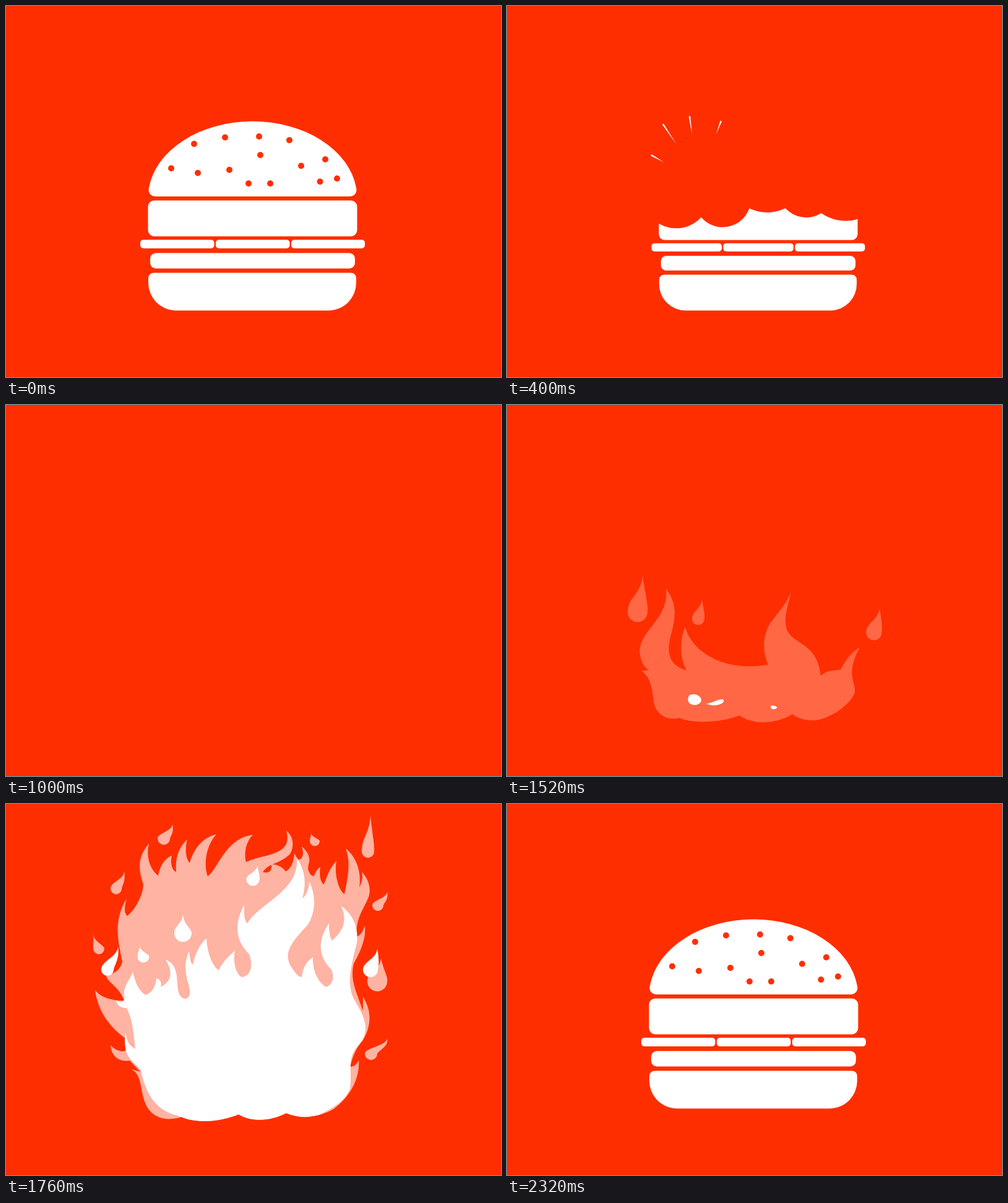
An HTML page that plays this animation: 800 by 600 pixels, repeating every 2.92 s.

```html
<!DOCTYPE html>
<html lang="en">
<head>
<meta charset="utf-8">
<title>Burger</title>
<style>
  html, body { margin: 0; width: 100%; height: 100%; overflow: hidden; background: #ff2e00; }
  svg { display: block; width: 100vw; height: 100vh; }
</style>
</head>
<body>
<svg viewBox="0 0 800 600" fill="#fff">
  <rect width="800" height="600" fill="#ff2e00"/>
  <g id="burger">
    <path d="M242 308C234 308 229 302 231 294A169 124 0 0 1 566 294C568 302 563 308 555 308Z"/>
    <g id="seeds" fill="#ff2e00"></g>
    <rect x="229.5" y="314.5" width="338" height="58" rx="10"/>
    <rect x="217" y="378" width="119.5" height="14" rx="5"/>
    <rect x="339" y="378" width="119.5" height="14" rx="5"/>
    <rect x="461" y="378" width="119" height="14" rx="5"/>
    <rect x="233" y="399.5" width="331" height="25" rx="9"/>
    <path d="M240 431.5H556.5Q566 431.5 566 441V447A45 45 0 0 1 521 492.5H275A45 45 0 0 1 230 447V441Q230 431.5 240 431.5Z"/>
    <g id="bites" fill="#ff2e00">
      <path d="M330 150A60 60 0 0 0 352 216A72 72 0 0 0 444.7 318.3A48 48 0 0 0 505.8 326.7A70 70 0 0 0 610 300V100Z"/>
      <path d="M201 295A58 58 0 0 0 301.6 334A48 48 0 0 0 386 304V150H201Z"/>
      <path d="M353 349.6A58 58 0 0 0 412.7 386A49 49 0 0 0 486.4 410A48 48 0 0 0 565 440.5L620 430V290H353Z"/>
    </g>
  </g>
  <path id="sparks"/>
  <g id="pale"><path id="outer"/><path id="paleDrops"/></g>
  <path id="inner"/>
  <path id="whiteDrops"/>
  <g id="embers">
    <path d="M294 470C299 466 309 467 313 474C317 481 308 486 302 485C294 484 290 479 294 470Z"/>
    <path d="M322 483C333 482 340 475 349 476C353 479 348 484 340 485Q330 487 322 483Z"/>
    <path d="M426 487Q431 484 437 489Q433 494 427 491Z"/>
  </g>
</svg>
<script>
const LOOP = 2920, STEP = 40, POINTS = 800;
const $ = id => document.getElementById(id);
const clamp = (v, a = 0, b = 1) => Math.min(b, Math.max(a, v));
const lerp = (a, b, k) => a + (b - a) * k;
const show = (el, on) => el.setAttribute('display', on ? 'inline' : 'none');

const seeds = [[304,223],[354,212.5],[409,211],[458,217],[411,241],[516,248],[267,262.5],
  [310,270],[361,265],[477,258.5],[392,287],[427,287],[507.5,284],[535,279]];
$('seeds').innerHTML = seeds.map(([x, y]) => `<circle cx="${x}" cy="${y}" r="5"/>`).join('');

// Each bite: start, spark centre, side (1 = from the left, -1 = from the right)
const bites = [[120, 522, 220, -1], [320, 310, 278, 1], [560, 502, 358, -1], [800, 310, 352, 1]];
const rays = [[-36,-54,-58,-87], [-11,-71,-15,-100], [28,-71,36,-92], [-56,-25,-77,-37]];

const flames = {
  low: `M376 502C345 514 300 516 279 506C258 511 240 500 237 480C235 455 230 438 217 430L229 429
    C216 420 212 400 216 388C224 360 262 340 257 297C276 322 272 345 266 368C258 395 258 420 290 429
    C279 408 279 380 288 359C296 388 320 405 345 415C370 424 398 424 422 420C412 395 414 375 424 355
    C438 335 452 322 459 302C455 325 445 345 453 365C464 388 502 385 507 438C517 428 528 430 539 428
    C548 412 556 400 570 392C561 408 556 425 558 440C560 452 563 455 562 465C555 485 525 505 500 510
    C485 511 470 507 461 500C440 514 400 520 376 502Z`,
  tall: `M376 502C345 514 300 516 284 506C262 513 240 510 228 490C215 465 222 440 203 429L217 433L200 415
    C180 418 170 405 169 390C178 400 190 402 194 398L194 380C178 368 150 345 144 301C155 315 175 318 191 318
    C183 295 165 290 162 278C175 275 185 268 188 255C182 225 172 190 195 153C190 170 192 178 196 181
    C215 165 222 140 222 130C213 105 213 85 231 64C226 85 232 105 246 116C249 100 255 90 268 83
    C265 95 268 107 275 110C273 85 280 70 293 57C288 75 292 92 297 95C303 75 315 55 340 49
    C325 65 318 95 326 117C343 105 355 55 399 50C388 60 384 80 388 94C415 80 465 85 453 43
    C468 55 464 75 458 82C440 98 425 95 415 110C425 113 430 108 429 98C437 97 447 102 452 109
    C460 105 465 95 466 80L472 90C480 90 482 80 478 69C490 78 492 90 489 97L488 105C490 112 494 118 498 116
    C500 110 503 105 508 102C506 115 508 125 513 130C518 125 518 110 534 92C530 115 538 140 547 146
    C552 120 558 95 549 72C566 85 575 110 571 135C576 125 577 118 575 110C590 125 590 145 584 155
    C575 175 566 185 566 215C574 212 577 205 580 197C582 215 575 235 562 258C556 285 565 300 577 335
    L577 312C592 335 590 360 577 382C565 395 560 410 556 425C563 425 568 420 570 414
    C572 440 560 470 530 493C505 507 480 510 453 500C425 514 395 514 376 502Z`,
  core: `M376 502C345 514 310 518 280 505C250 498 228 480 218 430C205 415 188 410 193 370
    C196 385 200 392 209 396C206 370 205 350 195 330C188 330 180 328 178 318C188 322 193 320 191 310
    C189 295 200 285 205 272C210 292 215 302 226 309C236 305 242 295 243 282C250 283 252 290 250 296
    C260 290 275 280 258 252C275 258 276 275 277 290C277 305 282 315 290 315C300 313 298 300 293 285
    C288 265 290 250 296 238C298 250 298 258 302 260C306 240 315 225 324 217C325 240 333 262 344 269
    C348 258 358 248 370 237C366 255 372 278 382 280C395 278 400 262 393 243C375 225 365 200 385 163
    C384 180 386 190 390 193C410 160 475 140 470 87C485 110 485 130 479 153C485 148 490 138 490 125
    C502 150 500 175 488 195C465 220 445 240 462 265C468 275 474 280 478 280C480 265 485 255 496 248
    C495 270 505 290 518 296C530 290 530 278 526 268C508 250 500 225 522 193C522 205 523 215 527 221
    C545 205 552 190 542 165C562 180 570 200 567 225C558 260 550 290 562 315C580 345 590 365 570 390
    C550 410 560 430 556 460C550 478 530 492 505 503C485 508 470 507 453 500C425 514 395 514 376 502Z`,
  spark: `M376 500C340 506 300 500 292 478Q300 462 314 478Q370 486 436 488Q450 492 436 498Q400 504 376 500Z`,
  ring: `M384 512C360 513 340 511 322 508C290 510 245 508 238 475C232 455 215 430 205 420
    C190 415 172 405 167 389C175 393 180 394 186 393C155 360 150 330 164 314C168 305 165 292 163 284
    C175 292 178 305 177 321C186 305 190 275 164 264C175 264 185 270 188 274C188 260 190 248 193 238
    C195 250 205 262 216 266C205 235 208 205 222 190C240 175 248 158 230 139C250 145 258 160 256 178
    C252 200 235 220 257 241C267 230 280 220 290 216Q287 209 279 203Q293 206 304 224L328 200
    Q330 190 323 185Q345 193 353 217L390 190L440 190L450 226L468 226L490 205Q484 195 478 184
    C495 190 510 205 518 222L529 230C540 218 550 207 574 203C562 212 556 230 569 252
    C580 240 592 237 608 238C595 248 592 275 600 297C610 295 617 285 619 274C625 285 625 295 620 306
    C610 322 592 335 595 360C605 357 610 350 612 338C620 355 618 385 602 405C612 403 622 395 625 384
    C628 405 622 420 605 435C590 445 575 452 565 459C566 475 562 485 545 493C520 506 480 507 447 505
    C425 511 400 513 384 512Z`,
  dying: `M384 512C330 514 260 512 240 490C225 480 215 470 205 455Q225 465 235 470Q240 455 232 440
    Q260 460 265 475C300 480 340 485 400 484C450 484 500 480 530 470Q545 460 548 440Q560 455 556 470
    Q575 465 590 452C580 480 560 500 520 506C480 510 430 514 384 512Z`
};

function sample(d) {
  const path = document.createElementNS('http://www.w3.org/2000/svg', 'path');
  path.setAttribute('d', d);
  const length = path.getTotalLength();
  return Array.from({ length: POINTS }, (_, i) => path.getPointAtLength(length * i / POINTS));
}
const outlines = {};
for (const name in flames) outlines[name] = sample(flames[name]);

const outerKeys = [[1520, 'low'], [1760, 'tall'], [2000, 'ring'], [2300, 'dying']];
const innerKeys = [[1520, 'spark'], [1760, 'core'], [2000, 'ring']];

function morph(keys, t) {
  let i = 0;
  while (i < keys.length - 2 && t >= keys[i + 1][0]) i++;
  const [t0, a] = keys[i], [t1, b] = keys[i + 1], k = clamp((t - t0) / (t1 - t0));
  if (k === 0) return flames[a];
  if (k === 1) return flames[b];
  return 'M' + outlines[a].map((p, j) => {
    const q = outlines[b][j];
    return lerp(p.x, q.x, k).toFixed(1) + ' ' + lerp(p.y, q.y, k).toFixed(1);
  }).join('L') + 'Z';
}

// Drops: time of full size, tip x and y, belly x and y, belly radius
const paleDrops = [
  [1520,219,276,211,335,16], [1520,315,314,309,346,10], [1520,602,328,593,368,12.5],
  [1760,269,33,255,56,10], [1760,191,109,178,137,9], [1760,141,206,150,234,9],
  [1760,589,18,585,77,10], [1760,493,44,499,60,8], [1760,616,142,601,164,9],
  [1760,616,379,590,404,10], [1760,606,250,600,287,16]];
const whiteDrops = [
  [1760,286,177,286,209,14], [1760,406,100,399,122,10.5], [1760,216,226,222,247,9.5],
  [1760,181,230,164,268,10], [1760,600,234,589,268,12],
  [2000,296,120,281,147,9.5], [2000,172,205,166,231,10], [2000,530,125,535,148,11],
  [2000,616,167,610,193,9], [2000,647,310,639,345,9.5]];

function drop([peak, tx, ty, bx, by, r], t) {
  const age = t - peak, size = 1 - Math.abs(age) / 170;
  if (size <= 0) return '';
  const cx = bx + age * (bx - 398) * 0.0006, cy = by - age * 0.16;
  const dx = (tx - bx) * size, dy = (ty - by) * size;
  r *= size;
  const lean = Math.sign(dx) * r * 0.5;
  return `M${cx + dx} ${cy + dy}C${cx + dx + lean * .6} ${cy + dy * .45} ${cx + r * 1.1} ${cy + dy * .2} ${cx + r} ${cy}` +
    `A${r} ${r} 0 0 1 ${cx - r} ${cy}C${cx - r} ${cy + dy * .4} ${cx + dx - lean * .2} ${cy + dy * .5} ${cx + dx} ${cy + dy}Z`;
}

function ray([ix, iy, ox, oy], [start, cx, cy, side], t) {
  const age = t - start, length = Math.hypot(ox - ix, oy - iy);
  const head = clamp(age / 80), tail = clamp((age - 80) * 0.46 / length);
  if (age <= 0 || tail >= 1) return '';
  const at = k => [cx + side * lerp(ix, ox, k), cy + lerp(iy, oy, k)];
  const [ax, ay] = at(tail), [bx, by] = at(head);
  const nx = (oy - iy) / length * 1.3, ny = -side * (ox - ix) / length * 1.3;
  return `M${ax} ${ay}L${bx + nx} ${by + ny}L${bx - nx} ${by - ny}Z`;
}

function drawBurger(t) {
  const back = t >= 1920;
  show($('burger'), t < 800 || back);
  let transform = '';
  bites.forEach(([start, , , side], i) => {
    const bitten = t >= start && !back, age = t - start;
    if ($('bites').children[i]) show($('bites').children[i], bitten);
    if (bitten && age < 185) {
      const s = 1 - 0.052 * Math.sin(Math.PI * age / 185) ** 2;
      const x = 398 + side * 152;
      transform = `translate(${x} 492) scale(${s}) translate(${-x} -492)`;
    }
  });
  $('burger').setAttribute('transform', transform);
  $('sparks').setAttribute('d', bites.flatMap(b => rays.map(r => ray(r, b, t))).join(''));
}

function drawFire(t) {
  const burning = t >= 1520 && t < 2320;
  show($('pale'), burning);
  show($('inner'), burning && t >= 1560 && t <= 2000);
  show($('whiteDrops'), burning && t >= 1600);
  show($('embers'), t >= 1520 && t < 1560);
  if (!burning) return;
  $('pale').setAttribute('opacity', clamp(0.27 + (t - 1520) * 0.00153));
  $('outer').setAttribute('d', morph(outerKeys, t));
  $('inner').setAttribute('d', morph(innerKeys, t));
  $('paleDrops').setAttribute('d', paleDrops.map(d => drop(d, t)).join(''));
  $('whiteDrops').setAttribute('d', whiteDrops.map(d => drop(d, t)).join(''));
}

function draw(now) {
  const t = Math.floor((now % LOOP) / STEP) * STEP;
  drawBurger(t);
  drawFire(t);
}

let origin;
function tick(now) {
  origin ??= now;
  draw(Math.max(0, now - origin));
  requestAnimationFrame(tick);
}
draw(0);
requestAnimationFrame(tick);
</script>
</body>
</html>
```
